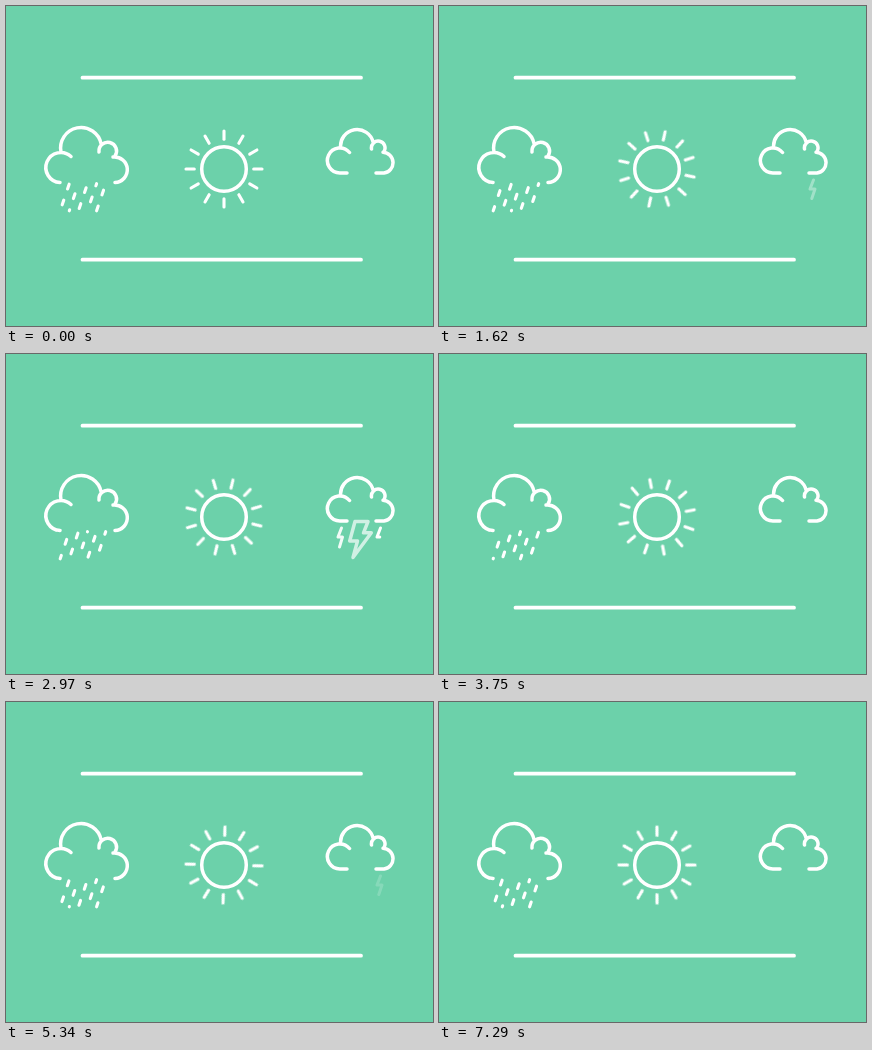
Write an HTML page that moves like this. It is 427 px wide and 320 px high and loops after 7.32 s.

```html
<!DOCTYPE html>
<html lang="en">
<head>
<meta charset="utf-8">
<title>Weather icons</title>
<style>
  html, body { margin: 0; width: 100%; height: 100%; overflow: hidden; background: #6cd1aa; }
  svg { display: block; width: 427px; height: 320px; }
  .ink { fill: none; stroke: #fff; stroke-width: 3.5; stroke-linecap: round; stroke-linejoin: round; }
  .bar { stroke-width: 3.8; }
  .thin { stroke-width: 3.1; }

  #rays { transform-origin: 218px 163px; animation: spin 7320ms linear infinite; }
  #rain line { stroke-dasharray: 5 11.8; animation: fall 7320ms linear infinite; }

  .bolt { opacity: 0; stroke-dasharray: 1 2; }
  .big { animation: flash 1830ms linear infinite; }
  .small { stroke-width: 3; animation: spark 1830ms linear infinite; }
  .late { animation-delay: -1530ms; }

  /* Both 7320 ms cycles rest briefly at the seam. */
  @keyframes spin {
    0%, .41% { transform: rotate(0deg); }
    99.59%, 100% { transform: rotate(330deg); }
  }
  @keyframes fall {
    0%, .41% { stroke-dashoffset: var(--from); }
    99.59%, 100% { stroke-dashoffset: calc(var(--from) - 184.8px); }
  }
  @keyframes flash {
    0%, 16.39% { opacity: 0; stroke-dashoffset: 1; }
    16.4% { opacity: 1; stroke-dashoffset: 1; }
    32.8% { opacity: 1; stroke-dashoffset: 0; }
    48% { opacity: .38; stroke-dashoffset: 0; }
    65.6% { opacity: .75; stroke-dashoffset: 0; }
    82%, 100% { opacity: 0; stroke-dashoffset: 0; }
  }
  @keyframes spark {
    0%, 37.69% { opacity: 0; stroke-dashoffset: 1; }
    37.7% { opacity: 1; stroke-dashoffset: 1; }
    54.1% { opacity: 1; stroke-dashoffset: 0; }
    60.7% { opacity: 1; stroke-dashoffset: 0; }
    78.7%, 100% { opacity: 0; stroke-dashoffset: 0; }
  }
</style>
</head>
<body>
<svg viewBox="0 0 427 320">
  <g class="ink">
    <path class="bar" d="M76.5 71.7H355M76.5 253.7H355"/>

    <!-- rain cloud -->
    <path d="M54 176.5A15 15 0 1 1 65 150.5
             M55 146A20.3 20.3 0 0 1 95.2 138
             M93 146A8.8 8.8 0 1 1 109 150
             M107 151A12.8 12.8 0 1 1 109 176.5"/>
    <g id="rain" class="thin"></g>

    <!-- sun -->
    <circle cx="218" cy="163" r="22.3"/>
    <g id="rays" class="thin"></g>

    <!-- storm cloud -->
    <path d="M341 167H334A12.5 12.5 0 1 1 343.5 146.5
             M334.7 142A16.5 16.5 0 0 1 367.2 136.5
             M365.5 143A6.8 6.8 0 1 1 377.8 145.8
             M377 146.3A10.4 10.4 0 0 1 378 167H370"/>
    <path class="bolt big" pathLength="1" d="M349 167.5H362L357.5 178.8H365.3L347 203.5L351.5 187H343.7Z"/>
    <path class="bolt small" pathLength="1" d="M335.5 174L332 183H336.5L333.5 193"/>
    <path class="bolt small late" pathLength="1" d="M374.5 174L371 183H376L372.8 192.5"/>
  </g>
</svg>
<script>
  function addLine(id, x1, y1, x2, y2) {
    const line = document.createElementNS("http://www.w3.org/2000/svg", "line");
    Object.entries({ x1, y1, x2, y2 }).forEach(([key, value]) => line.setAttribute(key, value));
    document.getElementById(id).append(line);
    return line;
  }

  for (let angle = 0; angle < 360; angle += 30) {
    addLine("rays", 218, 125, 218, 133.3).setAttribute("transform", `rotate(${angle} 218 163)`);
  }

  // Distance of the first drop from the top of each stream.
  [0.5, 10.7, 4.3, 14.1, 6.8].forEach((start, i) => {
    const x = 63.3 + 9.1 * i;
    addLine("rain", x, 177.7, x - 9.1, 204.8).style.setProperty("--from", `${-start}px`);
  });
</script>
</body>
</html>
```
